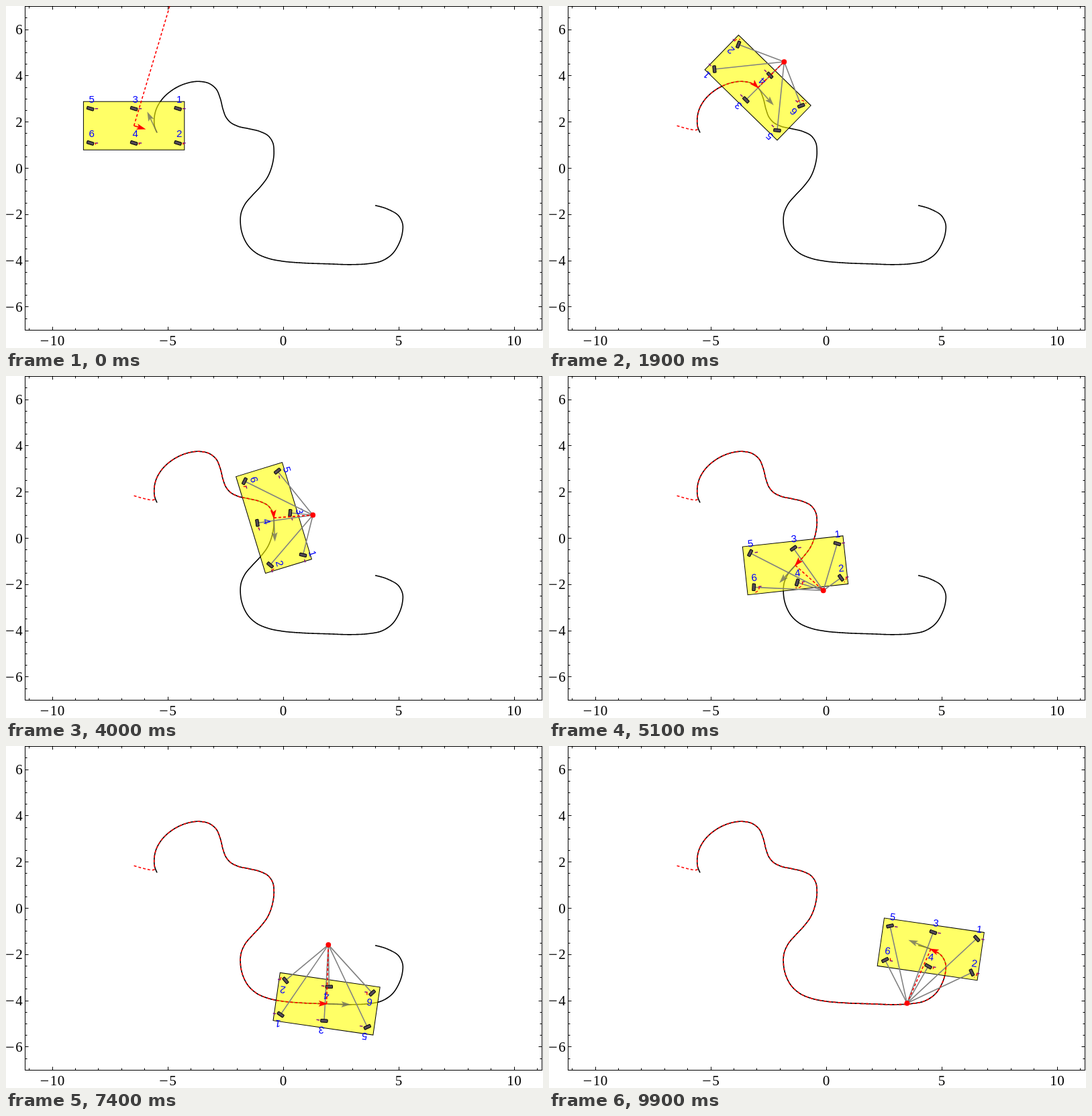
Recreate the animation shown at these times as an HTML page with a canvas. Size 800x509 px, loop 10000 ms.

```html
<!DOCTYPE html>
<html lang="en">
<head>
<meta charset="utf-8">
<title>Six-wheel robot following a path</title>
<style>
html, body { margin: 0; width: 100%; height: 100%; overflow: hidden; background: #fff; }
canvas { display: block; }
</style>
</head>
<body>
<canvas id="stage" width="800" height="509"></canvas>
<script>
const ctx = document.getElementById('stage').getContext('2d');
const LOOP = 10000, STEP = 100, POSES = LOOP / STEP;
const UNIT = 34.4, X0 = 413, Y0 = 241.5;
const BOX = { l: 28.5, t: 0.5, r: 798.5, b: 482.5 };
const GAIN = 70, SPIN = 4 * Math.PI / 10;

// Waypoints of the black path
const nodes = [
  [225, 188.5], [221.5, 179.5], [220.8, 168], [223.5, 154.5], [232, 139.5], [247.5, 125.3],
  [266, 116], [288, 112.3], [303, 115.5], [313, 123.5], [319, 137], [323.5, 154.5],
  [327.5, 165], [334, 172.9], [345, 178.8], [362, 182.7], [379, 187], [391, 193.5],
  [397.5, 203.5], [399.2, 217], [397, 235], [390, 254], [379, 269], [367, 281.8],
  [356, 295], [350.3, 308], [349.3, 324], [353, 342], [361.5, 357.5], [374, 368.5],
  [390.5, 375.5], [413, 380], [440, 382.3], [480, 383.8], [516, 384.8], [540, 383.5],
  [559.4, 379.6], [575, 369.5], [585, 354.5], [590.5, 337.5], [591, 325], [585.5, 313],
  [568.75, 302.4], [550, 296.8]
];

function hermite(a, b, ma, mb, h, u) {
  const v = 1 - u;
  return a * v * v * (1 + 2 * u) + b * u * u * (3 - 2 * u) + h * u * v * (ma * v - mb * u);
}

function buildPath() {
  const n = nodes.length - 1, h = [], d = [], m = [];
  for (let i = 0; i < n; i++) {
    const dx = nodes[i + 1][0] - nodes[i][0], dy = nodes[i + 1][1] - nodes[i][1];
    h[i] = Math.hypot(dx, dy);
    d[i] = [dx / h[i], dy / h[i]];
  }
  for (let i = 1; i < n; i++)
    m[i] = [0, 1].map(k => (d[i - 1][k] * h[i] + d[i][k] * h[i - 1]) / (h[i - 1] + h[i]));
  m[0] = [0, 1].map(k => (3 * d[0][k] - m[1][k]) / 2);
  m[n] = [0, 1].map(k => (3 * d[n - 1][k] - m[n - 1][k]) / 2);

  const pts = [nodes[0]], len = [0], nodeLen = [0], parts = 40;
  for (let i = 0; i < n; i++) {
    for (let j = 1; j <= parts; j++) {
      const p = [0, 1].map(k =>
        hermite(nodes[i][k], nodes[i + 1][k], m[i][k], m[i + 1][k], h[i], j / parts));
      const q = pts[pts.length - 1];
      len.push(len[len.length - 1] + Math.hypot(p[0] - q[0], p[1] - q[1]));
      pts.push(p);
    }
    nodeLen.push(len[len.length - 1]);
  }
  return { pts, len, nodeLen };
}
const path = buildPath();

function pointAt(s) {
  let lo = 0, hi = path.len.length - 1;
  while (hi - lo > 1) {
    const mid = (lo + hi) >> 1;
    if (path.len[mid] <= s) lo = mid; else hi = mid;
  }
  const u = (s - path.len[lo]) / (path.len[hi] - path.len[lo]);
  const a = path.pts[lo], b = path.pts[hi];
  return [a[0] + (b[0] - a[0]) * u, a[1] + (b[1] - a[1]) * u];
}

// Seconds, travelled length, speed
const keys = [[0, 0, 200], [0.15, 20, 95]].concat(
  [[1, 5, 84.7], [2.8, 13, 59.1], [5.1, 23, 70.3], [6.6, 30, 101], [8.3, 36, 60.6], [9.9, 42, 112]]
    .map(([t, i, v]) => [t, path.nodeLen[i] + v / GAIN, v]));

function travel(t) {
  let i = 0;
  while (i < keys.length - 2 && t > keys[i + 1][0]) i++;
  const [a, b] = [keys[i], keys[i + 1]], h = b[0] - a[0];
  return hermite(a[1], b[1], a[2], b[2], h, (t - a[0]) / h);
}

// The robot chases a guide point that runs along the path
const trail = [], poses = [];
(function simulate() {
  const dt = 0.001;
  let x = 190.6, y = 178.2, th = 0;
  for (let i = 0; i <= (POSES - 1) * STEP; i++) {
    const t = i * dt, s = travel(t), guide = pointAt(s);
    const vx = GAIN * (guide[0] - x), vy = GAIN * (guide[1] - y), w = GAIN * (SPIN * t - th);
    if (i % 5 === 0) trail.push([x, y]);
    if (i % STEP === 0) {
      const next = pointAt(s + 0.8);
      const dir = Math.atan2(next[1] - guide[1], next[0] - guide[0]);
      poses.push({ x, y, th, vx, vy, w, guide, dir });
    }
    x += vx * dt;
    y += vy * dt;
    th += w * dt;
  }
})();

function line(pts, color, width, dash = []) {
  ctx.beginPath();
  pts.forEach(p => ctx.lineTo(p[0], p[1]));
  ctx.strokeStyle = color;
  ctx.lineWidth = width;
  ctx.setLineDash(dash);
  ctx.stroke();
  ctx.setLineDash([]);
}

function arrow(x, y, angle, length, color) {
  ctx.save();
  ctx.translate(x, y);
  ctx.rotate(angle);
  if (length > 11) line([[0, 0], [length - 11, 0]], color, 1.6);
  ctx.translate(length, 0);
  ctx.beginPath();
  [[0, 0], [-14, -4.5], [-11, 0], [-14, 4.5]].forEach(p => ctx.lineTo(p[0], p[1]));
  ctx.fillStyle = color;
  ctx.fill();
  ctx.restore();
}

function tickLabel(v, x, y, centred) {
  const digits = String(Math.abs(v)), wide = 11 * digits.length, minus = v < 0 ? 15 : 0;
  const left = centred ? x - (wide + minus) / 2 : x - wide - minus;
  ctx.font = '21px "Liberation Serif", serif';
  ctx.textAlign = 'center';
  ctx.textBaseline = 'alphabetic';
  ctx.fillStyle = '#000';
  [...digits].forEach((c, i) => ctx.fillText(c, left + minus + 11 * i + 5.5, y));
  if (minus) {
    ctx.font = '24px "Liberation Serif", serif';
    ctx.fillText('\u2212', left + 7, y + 1);
  }
}

function axes() {
  ctx.strokeStyle = '#000';
  ctx.lineWidth = 1;
  ctx.strokeRect(BOX.l, BOX.t, BOX.r - BOX.l, BOX.b - BOX.t);
  for (let v = -11; v <= 11; v++) {
    const x = Math.floor(X0 + v * UNIT) + 0.5, n = v % 5 ? 3 : 5;
    line([[x, BOX.b], [x, BOX.b - n]], '#000', 1);
    line([[x, BOX.t], [x, BOX.t + n]], '#000', 1);
    if (v % 5 === 0) tickLabel(v, X0 + v * UNIT, 505, true);
  }
  for (let v = -6.5; v <= 6.5; v += 0.5) {
    const y = Math.floor(Y0 - v * UNIT) + 0.5, n = v % 2 ? 3 : 5;
    line([[BOX.l, y], [BOX.l + n, y]], '#000', 1);
    line([[BOX.r, y], [BOX.r - n, y]], '#000', 1);
    if (v % 2 === 0) tickLabel(v, 25, Y0 - v * UNIT + 7, false);
  }
}

// Wheel steering relative to the body, folded into a half turn
function steer(angle) {
  const low = -Math.PI / 3;
  return low + (((angle - low) % Math.PI) + Math.PI) % Math.PI;
}

function wheel(i, pose, pivot) {
  const ox = [65.5, 0, -65][i >> 1], oy = i % 2 ? 25.7 : -25.5;
  const c = Math.cos(pose.th), s = Math.sin(pose.th);
  const x = pose.x + ox * c + oy * s, y = pose.y - ox * s + oy * c;
  const roll = pivot ? Math.atan2(pivot[0] - x, y - pivot[1]) : Math.atan2(pose.vy, pose.vx);
  if (pivot) line([[x, y], pivot], '#808080', 1.6);
  const turn = steer(roll + pose.th);

  ctx.save();
  ctx.translate(x, y);
  ctx.rotate(-pose.th);
  line([[7, 0], [11.5, 0]], '#80108a', 1.5);
  if (i % 2) {
    ctx.beginPath();
    ctx.arc(0, 0, 8, 0, turn, turn < 0);
    ctx.strokeStyle = '#f00';
    ctx.lineWidth = 1.4;
    ctx.setLineDash([4, 3]);
    ctx.stroke();
    ctx.setLineDash([]);
  }
  ctx.save();
  ctx.rotate(turn);
  ctx.beginPath();
  ctx.roundRect(-5.2, -2.2, 10.4, 4.4, 1);
  ctx.fillStyle = '#544a58';
  ctx.fill();
  ctx.strokeStyle = '#000';
  ctx.lineWidth = 1;
  ctx.stroke();
  ctx.restore();
  ctx.font = '15px "Liberation Sans", sans-serif';
  ctx.textAlign = 'center';
  ctx.textBaseline = 'alphabetic';
  ctx.fillStyle = '#00f';
  ctx.fillText(i + 1, 2, -9);
  ctx.restore();
}

function draw(index) {
  const pose = poses[index];
  const speed = Math.hypot(pose.vx, pose.vy);
  const pivot = index ? [pose.x + pose.vy / pose.w, pose.y - pose.vx / pose.w] : null;
  ctx.clearRect(0, 0, 800, 509);
  axes();

  ctx.save();
  ctx.beginPath();
  ctx.rect(BOX.l, BOX.t, BOX.r - BOX.l, BOX.b - BOX.t);
  ctx.clip();
  line(path.pts, '#000', 1.6);

  ctx.save();
  ctx.translate(pose.x, pose.y);
  ctx.rotate(-pose.th);
  ctx.fillStyle = 'rgba(255,255,0,.6)';
  ctx.fillRect(-75.2, -36, 150.4, 72);
  ctx.strokeStyle = '#000';
  ctx.lineWidth = 1;
  ctx.strokeRect(-75.2, -36, 150.4, 72);
  ctx.restore();

  for (let i = 0; i < 6; i++) wheel(i, pose, pivot);
  arrow(pose.guide[0], pose.guide[1], pose.dir, 34.4, 'rgba(110,110,95,.8)');

  const far = pivot || [pose.x + pose.vy / speed * 300, pose.y - pose.vx / speed * 300];
  line([[pose.x, pose.y], far], '#f00', 1.6, [4, 3]);
  line(trail.slice(0, index * STEP / 5 + 1), '#f00', 1.6, [4, 3]);
  arrow(pose.x, pose.y, Math.atan2(pose.vy, pose.vx), 1.5 + speed * 0.0068, '#f00');
  if (pivot) {
    ctx.beginPath();
    ctx.arc(pivot[0], pivot[1], 3.9, 0, 7);
    ctx.fillStyle = '#f00';
    ctx.fill();
  }
  ctx.restore();
}

const start = performance.now();
function tick() {
  const t = Math.max(0, performance.now() - start) % LOOP;
  draw(Math.floor(t / STEP));
  requestAnimationFrame(tick);
}
tick();
</script>
</body>
</html>
```
